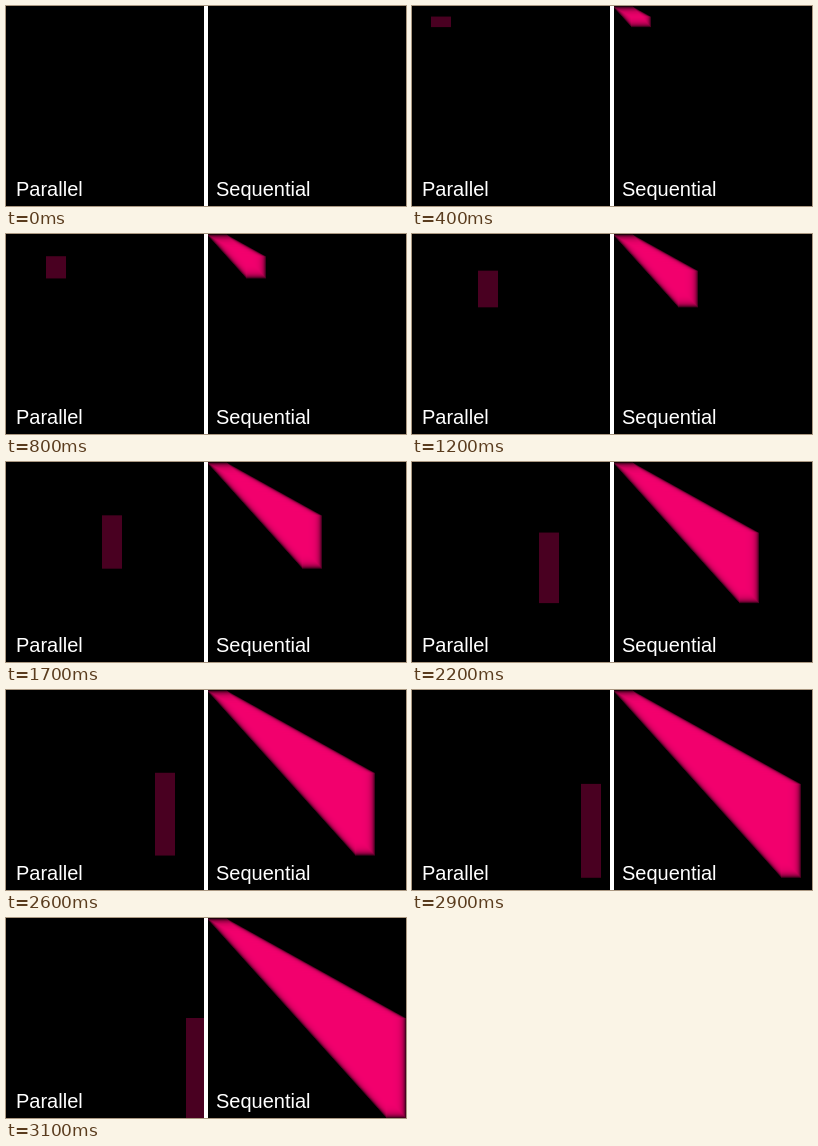
Animation, 400 px wide and 200 px high, one loop 3200 ms. Source, as an HTML page with a canvas:

```html
<!DOCTYPE html>
<html lang="en">
<head>
<meta charset="utf-8">
<title>Parallel and sequential drawing</title>
<style>
  html, body { margin: 0; width: 100%; height: 100%; overflow: hidden; background: #000; }
  canvas, svg { position: absolute; left: 0; top: 0; width: 400px; height: 200px; display: block; }
  text { font: 20px "Liberation Sans", Helvetica, Arial, sans-serif; fill: #fff; }
</style>
</head>
<body>
<canvas id="stage" width="400" height="200"></canvas>
<svg viewBox="0 0 400 200">
  <rect x="198" width="4" height="200" fill="#fff"/>
  <text x="10" y="190">Parallel</text>
  <text x="210" y="190">Sequential</text>
</svg>
<script>
  const LOOP = 3200, STEP = 100, TRAVEL = 180, BAR = 20, SIZE = 200;
  const ctx = document.getElementById('stage').getContext('2d');

  // [time in ms, bar position]: near-linear travel with a slow start
  const path = [
    [0, 0], [600, 28], [800, 40], [1200, 66], [1700, 96], [1800, 101],
    [2200, 127], [2400, 137], [2600, 149], [3000, 175], [3100, 180]
  ];

  function position(time) {
    const i = Math.max(1, path.findIndex(([t]) => t >= time));
    const [t0, x0] = path[i - 1], [t1, x1] = path[i];
    return Math.round(x0 + (x1 - x0) * (time - t0) / (t1 - t0));
  }

  // The bar grows from its top edge as it moves right and down
  function drawBar(left, x) {
    const h = x / TRAVEL * SIZE / 2;
    ctx.fillRect(left + x, h, BAR, h);
  }

  function render(time) {
    const end = position(time);
    ctx.fillStyle = '#000';
    ctx.fillRect(0, 0, 400, 200);
    ctx.fillStyle = 'rgba(240, 0, 110, 0.3)';
    drawBar(0, end);
    // The right side is never cleared, so every step builds up
    for (let x = 0; x <= end; x++) drawBar(SIZE, x);
  }

  const start = performance.now();
  function tick() {
    const time = (performance.now() - start) % LOOP;
    render(Math.floor(time / STEP) * STEP);
    requestAnimationFrame(tick);
  }
  tick();
</script>
</body>
</html>
```
